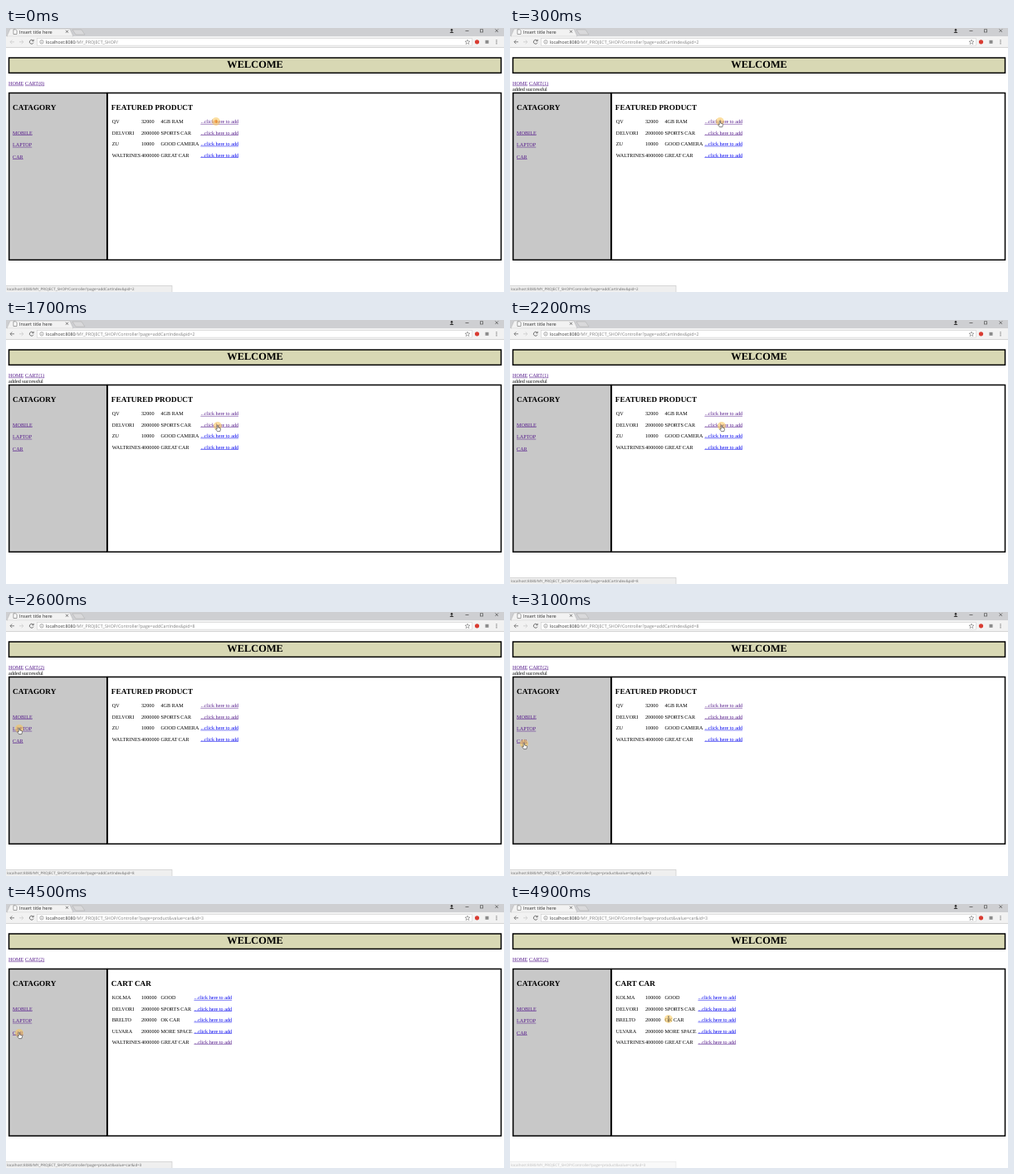
Recreate the animation shown at these times as an HTML page with a canvas. Size 600 by 319 pixels, loop 5000 ms.

```html
<!DOCTYPE html>
<html lang="en">
<head>
<meta charset="utf-8">
<title>Shop page</title>
<style>
  html, body { margin: 0; width: 100%; height: 100%; overflow: hidden; background: #fff; }
  canvas { display: block; }
</style>
</head>
<body>
<canvas id="stage" width="600" height="319"></canvas>
<script>
const ctx = document.getElementById('stage').getContext('2d');
const SERIF = '"Liberation Serif", serif', SANS = '"Open Sans", sans-serif';
const VISITED = '#551a8b', LINK = '#0000ee';
const LOOP = 5000, STEP = 100;
const ROOT = 'localhost:8080', SHOP = '/MY_PROJECT_SHOP/', PAGE = SHOP + 'Controller?page=';

// Each timeline entry holds until the next one starts.
const pages = [
  { at: 0, path: SHOP, cart: 0 },
  { at: 300, path: PAGE + 'addCartIndex&pid=2', cart: 1, added: true },
  { at: 2300, path: PAGE + 'addCartIndex&pid=8', cart: 2, added: true },
  { at: 4500, path: PAGE + 'product&value=car&id=3', cart: 2, cars: true },
];
const statuses = [
  { at: 0, path: 'addCartIndex&pid=2', alpha: 1 },
  { at: 700, path: 'addCartIndex&pid=2', alpha: 0.6 },
  { at: 800, alpha: 0 },
  { at: 2000, path: 'addCartIndex&pid=8', alpha: 1 },
  { at: 2700, path: 'product&value=laptop&id=2', alpha: 1 },
  { at: 3200, path: 'product&value=car&id=3', alpha: 1 },
  { at: 3600, path: 'product&value=car&id=3', alpha: 0.6 },
  { at: 3700, alpha: 0 },
  { at: 4200, path: 'product&value=car&id=3', alpha: 1 },
  { at: 4900, path: 'product&value=car&id=3', alpha: 0.4 },
];
// time, x, y
const moves = [
  [0, 253, 113], [1200, 253, 113], [1700, 255, 128], [2300, 255, 128],
  [2600, 16, 141], [2800, 16, 141], [3100, 17, 159], [3300, 16, 156],
  [4500, 16, 156], [4900, 191, 139], [LOOP, 191, 139],
];
const featured = [
  ['QV', '32000', '4GB RAM', VISITED],
  ['DELVORI', '2000000', 'SPORTS CAR', VISITED],
  ['ZU', '10000', 'GOOD CAMERA', LINK],
  ['WALTRINES', '4000000', 'GREAT CAR', LINK],
];
const cars = [
  ['KOLMA', '100000', 'GOOD', LINK],
  ['DELVORI', '2000000', 'SPORTS CAR', LINK],
  ['BRELTO', '200000', 'OK CAR', LINK],
  ['ULVARA', '2000000', 'MORE SPACE', LINK],
  ['WALTRINES', '4000000', 'GREAT CAR', VISITED],
];

const current = (list, t) => list.filter(e => e.at <= t).pop();

function cursorAt(t) {
  const i = moves.findIndex(m => m[0] > t);
  const [t0, x0, y0] = moves[i - 1], [t1, x1, y1] = moves[i];
  const p = (t - t0) / (t1 - t0), k = p * p * (3 - 2 * p);
  return [x0 + (x1 - x0) * k, y0 + (y1 - y0) * k];
}

function text(str, x, y, size = 6.2, color = '#000', family = SERIF, weight = '') {
  ctx.font = `${weight} ${size}px ${family}`;
  ctx.fillStyle = color;
  ctx.fillText(str, x, y);
  return ctx.measureText(str).width;
}

function link(str, x, y, color = VISITED) {
  const width = text(str, x, y, 6.2, color);
  rect(x, y + 0.6, width, 0.5, color);
}

function rect(x, y, w, h, fill, stroke, line = 1) {
  if (fill) { ctx.fillStyle = fill; ctx.fillRect(x, y, w, h); }
  if (stroke) { ctx.strokeStyle = stroke; ctx.lineWidth = line; ctx.strokeRect(x, y, w, h); }
}

function shape(d, fill, stroke, line = 0.8) {
  const path = new Path2D(d);
  if (fill) { ctx.fillStyle = fill; ctx.fill(path); }
  if (stroke) { ctx.strokeStyle = stroke; ctx.lineWidth = line; ctx.stroke(path); }
}

function dot(x, y, r, fill, stroke, line = 0.7) {
  ctx.beginPath();
  ctx.arc(x, y, r, 0, 7);
  if (fill) { ctx.fillStyle = fill; ctx.fill(); }
  if (stroke) { ctx.strokeStyle = stroke; ctx.lineWidth = line; ctx.stroke(); }
}

function drawBrowser(page) {
  rect(0, 0, 600, 10, '#cecfd2');
  rect(0, 10, 600, 13.5, '#f2f2f2');
  rect(0, 23, 600, 0.7, '#c4c4c4');
  shape('M1 10L5 1H77L81 10Z', '#f2f2f2', '#b0b0b0', 0.5);
  rect(2, 9.7, 78, 1, '#f2f2f2');
  shape('M80 2H91L95 8H84Z', '#d9d9db', '#aaa', 0.5);
  shape('M9 1.8H11.6L13 3.3V7.5H9Z', '#fff', '#666', 0.6);
  text('Insert title here', 16, 6.5, 5.6, '#333', SANS);
  shape('M72 2.8L75 5.8M75 2.8L72 5.8', null, '#444', 0.7);

  dot(537, 2.4, 1.3, '#333');
  shape('M534.5 6Q537 2.5 539.5 6Z', '#333');
  shape('M553.5 3.5H557.5M589.5 1.5L593 5M593 1.5L589.5 5', null, '#444', 0.7);
  rect(571.5, 1.8, 3.2, 3.2, null, '#444', 0.6);

  const back = page.cart ? '#666' : '#ccc';
  shape('M10 16.8H5M7.3 14.5L5 16.8L7.3 19.1', null, back);
  shape('M16 16.8H21M18.7 14.5L21 16.8L18.7 19.1', null, '#ccc');
  shape('M32.6 15.2A2.4 2.4 0 1 0 33 17.7M33.2 13.9V15.8H31.3', null, '#555');

  rect(37.5, 12.5, 524, 8.6, '#fff', '#cfcfcf', 0.6);
  dot(43, 16.8, 2.2, null, '#777', 0.6);
  shape('M43 16.4V18M43 15.2V15.7', null, '#777', 0.6);
  const width = text(ROOT, 48, 18.7, 5.27, '#333', SANS);
  text(page.path, 48 + width, 18.7, 5.27, '#808080', SANS);
  shape('M556 14L556.8 16.1H559L557.2 17.4L557.9 19.6L556 18.3L554.1 19.6L554.8 17.4L553 16.1H555.2Z', null, '#666', 0.5);
  dot(567.5, 16.8, 2.6, '#d93c32');
  rect(577.5, 14.8, 4, 4, '#8a8a8a');
  for (let y = 14.8; y < 20; y += 2) dot(591, y, 0.65, '#555');
}

function drawShop(page) {
  rect(3.5, 36, 593, 18.3, '#d8d8b4', '#000', 1.5);
  text('WELCOME', 266.2, 48.3, 12.45, '#000', SERIF, 'bold');
  link('HOME', 3, 69);
  link(`CART(${page.cart})`, 23, 69);
  if (page.added) text('added successful', 3, 76);

  rect(3.7, 78.5, 118, 201.7, '#c8c8c8', '#000', 1.5);
  rect(122.3, 78.5, 474.2, 201.7, '#fff', '#000', 1.5);
  text('CATAGORY', 8, 98.6, 9.28, '#000', SERIF, 'bold');
  ['MOBILE', 'LAPTOP', 'CAR'].forEach((name, i) => link(name, 8, 128.9 + i * 14.3));

  text(page.cars ? 'CART CAR' : 'FEATURED PRODUCT', 126.8, 98.6, 9.28, '#000', SERIF, 'bold');
  (page.cars ? cars : featured).forEach(([name, price, note, color], i) => {
    const y = 115.3 + i * 13.4;
    text(name, 127.7, y);
    text(price, 163, y);
    text(note, 186.5, y);
    link('...click here to add', page.cars ? 226.5 : 234.4, y, color);
  });
}

function drawStatus({ path, alpha }) {
  if (!alpha) return;
  ctx.globalAlpha = alpha;
  rect(-1, 311.3, 201, 9, '#efefef', '#c4c4c4', 0.6);
  text(ROOT + PAGE + path, 1, 317.4, 4.51, '#666', SANS);
  ctx.globalAlpha = 1;
}

function drawCursor(t) {
  const [x, y] = cursorAt(t);
  dot(x, y, 5, 'rgba(250, 196, 82, .55)');
  ctx.save();
  ctx.translate(x, y);
  if (t < STEP) dot(0, 0, 2, 'rgba(240, 140, 40, .7)');
  else if (t >= 4800) shape('M-1 -3H1M0 -3V3M-1 3H1', null, '#444', 0.6);
  else shape('M-.8 -.5Q0 -1.3 .6 -.5V2L3.2 2.7Q3.8 3 3.5 4.2L2.8 6.6H-.4L-2.4 3.8Q-2 2.8 -.8 4Z', '#fff', '#333', 0.6);
  ctx.restore();
}

function draw(now) {
  const t = Math.floor(now % LOOP / STEP) * STEP;
  const page = current(pages, t);
  ctx.textRendering = 'geometricPrecision';
  rect(0, 0, 600, 319, '#fff');
  drawBrowser(page);
  drawShop(page);
  drawStatus(current(statuses, t));
  drawCursor(t);
}

const start = performance.now();
function loop() {
  draw(performance.now() - start);
  requestAnimationFrame(loop);
}
loop();
</script>
</body>
</html>
```
